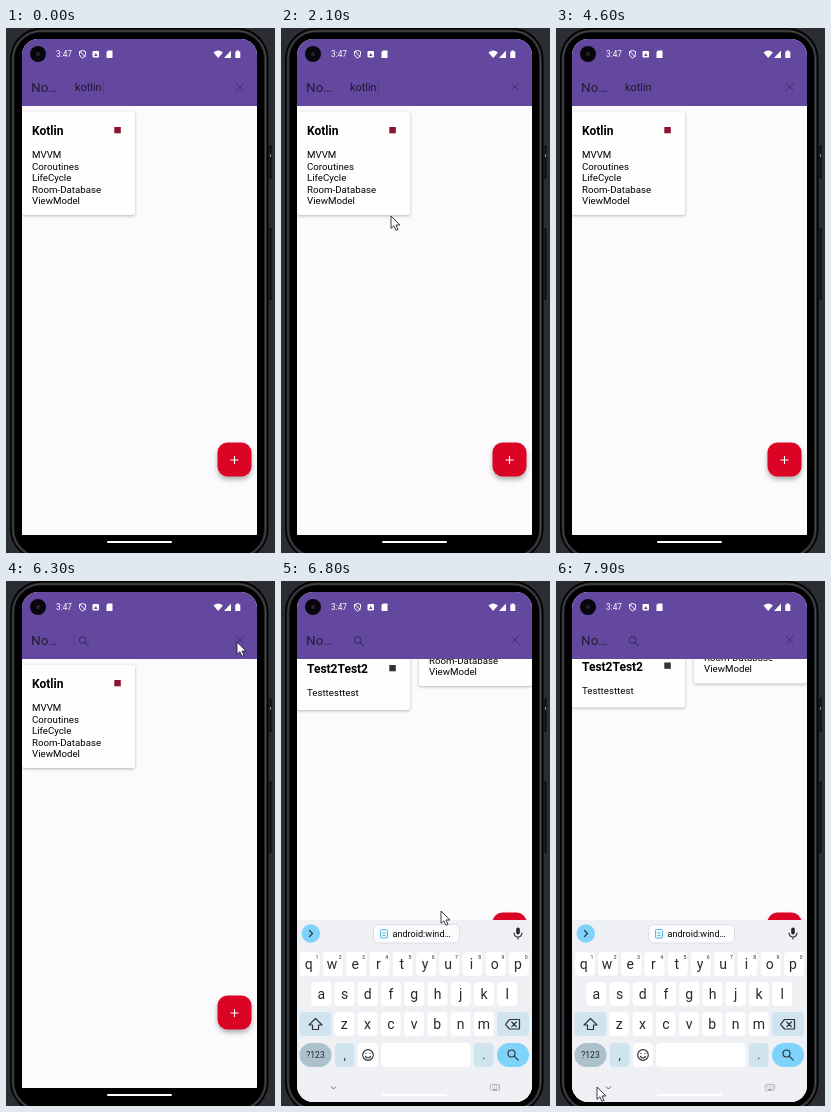
An HTML page that plays this animation: 269 by 525 pixels, repeating every 8 s.

```html
<!DOCTYPE html>
<html lang="en">
<head>
<meta charset="utf-8">
<title>Notes search</title>
<style>
  html, body { margin: 0; width: 100%; height: 100%; overflow: hidden; background: #2b2d32; }
  svg { display: block; width: 100%; height: 100%; font-family: Roboto, sans-serif; }
  .line { fill: none; stroke: #30343a; stroke-width: 1.2; stroke-linecap: round; stroke-linejoin: round; }
  .shade { filter: drop-shadow(0 1px 1.5px rgba(0, 0, 0, .28)); }
  .lift { filter: drop-shadow(0 3px 2.5px rgba(0, 0, 0, .3)); }
  .mid { text-anchor: middle; }
</style>
</head>
<body>
<svg viewBox="0 0 269 525">
  <defs>
    <clipPath id="screen"><rect x="16" y="11" width="235" height="510" rx="16"/></clipPath>
    <clipPath id="area"><rect id="areaBox" x="16" y="78" width="235" height="429"/></clipPath>
  </defs>

  <rect width="269" height="525" fill="#2b2d32"/>
  <path d="M264.500 117v34M264.500 200v72" stroke="#0d0e10" stroke-width="2"/>
  <path d="M264.500 126v3" stroke="#8a8c90"/>
  <rect x="4" y="0" width="258.500" height="532" rx="31" fill="#000"/>
  <rect x="7" y="3" width="252.500" height="526" rx="28" fill="none" stroke="#232428" stroke-width="3"/>
  <rect x="7" y="3" width="252.500" height="526" rx="28" fill="none" stroke="#4b4d51"/>

  <g clip-path="url(#screen)">
    <rect x="16" y="11" width="235" height="496" fill="#fcfafc"/>
    <rect id="navArea" x="16" y="507" width="235" height="14"/>
    <g clip-path="url(#area)">
      <g id="testCard"></g>
      <g id="kotlinCard"></g>
      <g id="fab">
        <rect class="lift" x="211.500" y="414.500" width="34" height="34" rx="10" fill="#dc0424"/>
        <path d="M224.500 432h8M228.500 428v8" stroke="#fff" stroke-width="1.1"/>
      </g>
    </g>

    <rect x="16" y="11" width="235" height="67" fill="#64489f"/>
    <circle cx="32" cy="26" r="8" fill="#08060d"/>
    <circle cx="32" cy="26" r="2" fill="#26232c"/>
    <text x="50" y="29" font-size="8.300" fill="#fff">3:47</text>
    <path d="M76.500 22.500l3 1v3q-.5 2.500-3 3.500q-2.500-1-3-3.500v-3zM73.500 23l6 6" fill="none" stroke="#fff"/>
    <rect x="86.500" y="23" width="6.500" height="6.500" rx="1" fill="#fff"/>
    <path d="M88 28l1.800-3 1.800 3z" fill="#64489f"/>
    <path d="M102 22.500h4.500v7.500h-6v-6z" fill="#fff"/>
    <path d="M207.500 24.500q4.700-3.800 9.400 0L212.200 30z" fill="#fff"/>
    <path d="M225 22.500V30h-7z" fill="#fff"/>
    <path d="M230.500 22.500h2.500v1h1.300V30h-5v-6.500h1.200z" fill="#fff"/>
    <text x="25" y="64.300" font-size="13.500" fill="#241a38">No…</text>
    <text id="query" x="69" y="63.300" font-size="10.900" fill="#20172f">kotlin</text>
    <g id="lens" class="line" style="stroke:#3d2d68">
      <circle cx="76.700" cy="59" r="3.200"/><path d="M79.200 61.500l3.300 3.300"/>
    </g>
    <path id="caret" d="M0 53v13" stroke="#563f8a"/>
    <path class="line" style="stroke:#403067;stroke-width:1" d="M230.200 55.300l7.200 7.200m0-7.200l-7.200 7.200"/>

    <g id="keyboard"></g>
    <rect id="scrim" x="16" y="507" width="235" height="14"/>
  </g>
  <rect x="101" y="513" width="65" height="2" rx="1" fill="#fff"/>
  <path id="cursor" d="M0 0V12.300L2.900 9.800L5 14.300L7 13.400L5 9H8.900Z" fill="#fff" stroke="#26262b" stroke-width=".9"/>
</svg>

<script>
const LOOP = 8000, STEP = 100, CLEARED = 6300, TYPING = 6400;
const $ = id => document.getElementById(id);

const text = (x, y, size, str, extra = '') =>
  `<text x="${x}" y="${y}" font-size="${size}" ${extra}>${str}</text>`;
const box = (x, y, w, h, r, fill, extra = '') =>
  `<rect x="${x}" y="${y}" width="${w}" height="${h}" rx="${r}" fill="${fill}" ${extra}/>`;
const line = d => `<path class="line" d="${d}"/>`;

// Cards are drawn from their own top-left corner.
function card(height, title, lines, color) {
  return box(0, 0, 113, height, 2.5, '#fefefd', 'class="shade"') +
    text(10, 23, 12, title, 'font-weight="700"') +
    box(92.3, 15, 6.5, 6.3, 0, color) +
    lines.map((s, i) => text(10, 46.3 + i * 11.4, 9.7, s)).join('');
}

function keyboard() {
  const key = (x, y, w, fill = '#fff', r = 4) => box(x, y, w, 24, r, fill);
  const pale = '#d0e4ef', sky = '#7fd3fb', ink = 'class="mid" fill="#26292d"';
  const row = (letters, x, y, digits = '') => [...letters].map((c, i) => {
    const cx = x + i * 23.25;
    return key(cx - 10, y, 20) +
      text(cx - (digits ? 1 : 0), y + 16.5, 14, c, ink) +
      (digits ? text(cx + 7.3, y + 6.5, 5.2, digits[i], ink) : '');
  }).join('');
  const dots = [0, 1, 2, 3].map(i => `M${211 + i * 2} 505h.8M${211 + i * 2} 507h.8`).join('');

  return box(16, 339, 235, 190, 0, '#eef0f4') +
    `<circle cx="29.800" cy="352.500" r="9.200" fill="${sky}"/>` + line('M28.500 349.500l3 3-3 3') +
    box(92.5, 343.5, 86, 18.5, 5, '#fbfcfe', 'stroke="#dadde2"') +
    box(99.5, 348.5, 7, 8.5, 1, '#eef9fe', 'stroke="#57b9e0"') +
    `<path d="M101.500 348.500h3M101.500 352h3M101.500 354.500h3" stroke="#57b9e0"/>` +
    text(111.5, 356, 9.1, 'android:wind…') +
    box(235.2, 346.5, 3.6, 7, 1.8, '#25282d') + line('M233 352q.5 4 4 4t4-4M237 356v2') +
    row('qwertyuiop', 28.7, 371, '1234567890') +
    row('asdfghjkl', 40.3, 401) +
    row('zxcvbnm', 63.3, 431) +
    key(18.5, 431, 32, pale) + line('M34.500 437.500l6.500 6.500h-3.500v4.500h-6v-4.500H28z') +
    key(216, 431, 32, pale) + line('M228.500 438.500h10v9.500h-10l-4-4.700zM230.800 441l4.600 4.600m0-4.600l-4.600 4.600') +
    key(18.5, 462, 32, '#abc1cc', 12) + text(34.5, 477.3, 8.5, '?123', ink) +
    key(54, 462, 19.5, pale) + text(63.8, 478, 12, ',', ink) +
    key(77, 462, 20) +
    `<circle class="line" cx="87" cy="474" r="5.300"/>` + line('M84.500 475.500q2.500 3 5 0M85 472.300v.2M89 472.300v.2') +
    key(100, 462, 89.5) +
    key(193, 462, 19.5, pale) + text(202.8, 478, 12, '.', ink) +
    key(216, 462, 32, sky, 12) +
    `<circle class="line" cx="230.500" cy="472.500" r="3.500"/>` + line('M233.200 475.200l4 4') +
    `<path d="M50 505.500l2.500 2.500 2.500-2.500" fill="none" stroke="#5d6167"/>` +
    box(209.5, 503.5, 9, 6, .8, 'none', 'stroke="#a3a7ae" stroke-width=".7"') +
    `<path d="${dots}M212 508.500h4" stroke="#8a8e95" stroke-width=".8"/>`;
}

// Each row is [time, value, value…], blended linearly.
const cursorPath = [
  [1600, 70, 150], [2000, 110, 188], [2800, 110, 188], [2900, 137, 424], [3100, 137, 331],
  [3400, 137, 331], [4200, 145, 290], [4400, 154, 448], [4800, 154, 264], [5600, 90, 139],
  [6100, 231, 61], [6300, 231, 61], [6500, 214, 92], [6800, 160, 330], [7300, 124, 423], [7900, 41, 506]
];
const cardPath = [
  [6300, 16, 0], [6400, 46, -30], [6500, 118, -84], [6600, 138, -84],
  [7000, 138, -80], [7300, 138, -80], [7600, 138, -84.5]
];
// Drop below its place, opacity, and darkness of the navigation strip.
const keyboardPath = [
  [6300, 186, .6, .5], [6400, 130, .7, .35], [6500, 42, .85, .18], [6600, 5, 1, 0], [6700, 0, 1, 0]
];
const testFade = [[6500, 0], [6800, 1]];

function at(track, t) {
  const i = track.findIndex(k => k[0] > t);
  if (i === 0) return track[0].slice(1);
  if (i < 0) return track[track.length - 1].slice(1);
  const a = track[i - 1], b = track[i], p = (t - a[0]) / (b[0] - a[0]);
  return a.slice(1).map((v, n) => v + (b[n + 1] - v) * p);
}

const set = (id, name, value) => $(id).setAttribute(name, value);
const move = (id, x, y) => set(id, 'transform', `translate(${x} ${y})`);
const show = (id, on) => set(id, 'visibility', on ? 'visible' : 'hidden');

function render(t) {
  const cleared = t >= CLEARED, typing = t >= TYPING;
  show('query', !cleared);
  show('lens', cleared);
  show('caret', t % 1000 < 500);
  move('caret', cleared ? 68.5 : 97.5, 0);

  const [x, scroll] = at(cardPath, t);
  move('kotlinCard', x, 84 + scroll);
  move('testCard', 16, 151 + scroll);
  set('testCard', 'opacity', at(testFade, t)[0]);

  set('areaBox', 'height', typing ? 261 : 429);
  set('navArea', 'fill', typing ? '#fcfafc' : '#000');
  move('fab', 0, typing ? -83 : 0);

  const [drop, opacity, dark] = at(keyboardPath, t);
  show('keyboard', typing);
  move('keyboard', 0, drop);
  set('keyboard', 'opacity', opacity);
  set('scrim', 'opacity', typing ? dark : 0);

  show('cursor', t >= 1600 && !(t >= 4500 && t < 4800));
  move('cursor', ...at(cursorPath, t));
}

$('kotlinCard').innerHTML = card(103, 'Kotlin',
  ['MVVM', 'Coroutines', 'LifeCycle', 'Room-Database', 'ViewModel'], '#8b1233');
$('testCard').innerHTML = card(60, 'Test2Test2', ['Testtesttest'], '#333');
$('keyboard').innerHTML = keyboard();

const start = performance.now();
function frame() {
  const t = (performance.now() - start) % LOOP;
  render(Math.floor(t / STEP) * STEP);
  requestAnimationFrame(frame);
}
frame();
</script>
</body>
</html>
```
